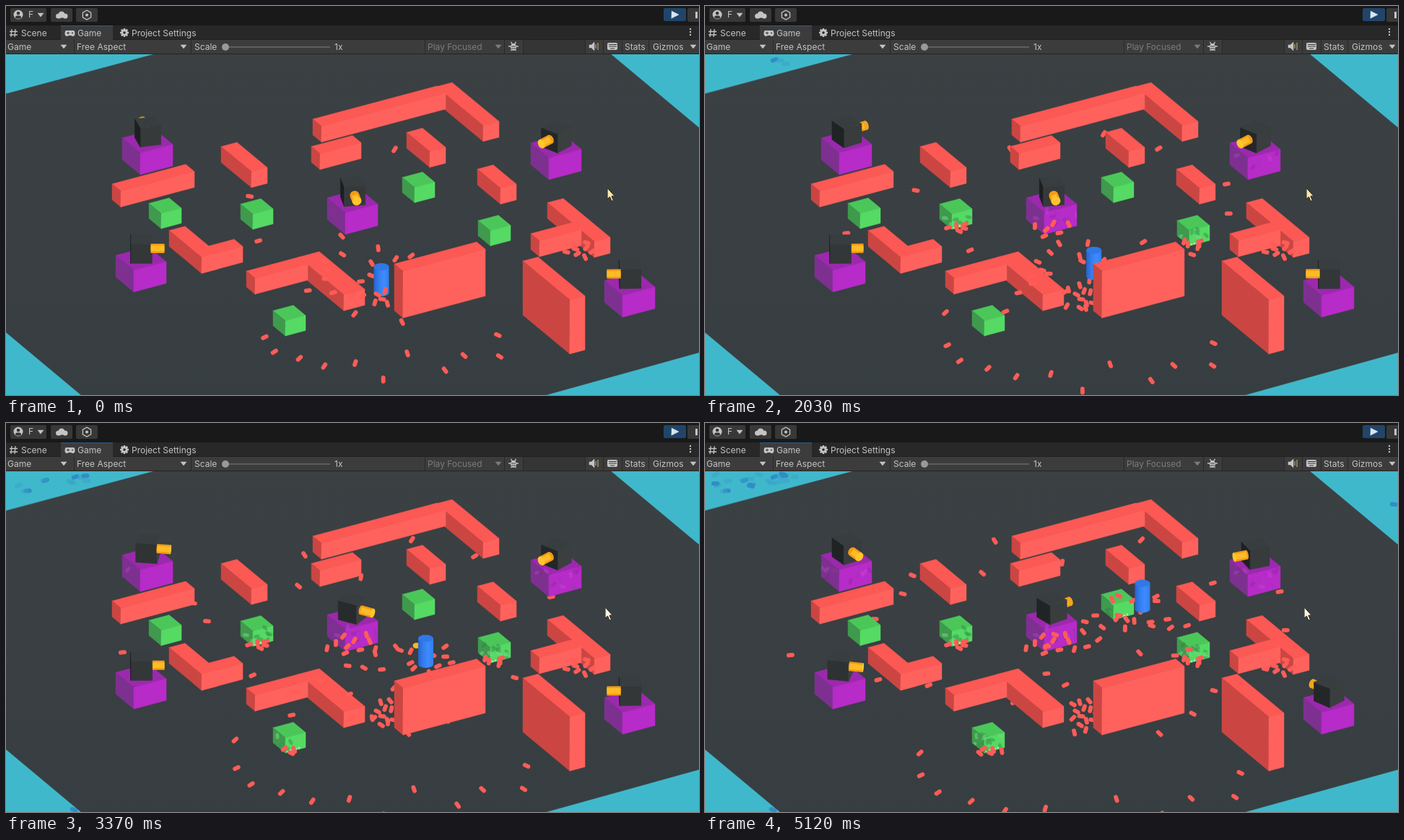
Recreate the animation shown at these times as an HTML page with a canvas. Size 960 by 540 pixels, loop 5190 ms.

```html
<!DOCTYPE html>
<html>
<head>
<meta charset="utf-8">
<style>
html, body { margin: 0; width: 100%; height: 100%; overflow: hidden; background: #191919; }
canvas { display: block; }
</style>
</head>
<body>
<canvas id="stage" width="960" height="540"></canvas>
<script>
const c = document.getElementById('stage').getContext('2d');
const LOOP = 5190, STEP = LOOP / 74;
const RISE = 0.267, FALL = 0.83, SQUASH = 0.46;
const RED = ['#fc5854', '#ff625c', '#cb4642'];
const GREEN = ['#4bc75a', '#55da64', '#3f9a4d'];
const PURPLE = ['#9c29ad', '#b72bc8', '#7e3091'];
const BULLET = '#ff5c57', MARK = '#318dc7', INK = '#c4c4c4';
const TURN = Math.PI * 2, GOLDEN = 2.39996;

// Near top corner and length: walls running back, then walls running right.
const backWalls = [
  [661, 166, 65], [340, 230, 42], [587, 202, 32], [685, 253, 32],
  [271, 349, 45], [468, 401, 63], [815, 327, 65]
];
const sideWalls = [
  [437, 167, 172], [435, 205, 57], [159, 257, 102],
  [271, 349, 57], [345, 378, 73], [739, 326, 58]
];
const crates = [
  { x: 215, y: 288, hit: 9 }, { x: 342, y: 289, hit: 0.7 }, { x: 566, y: 252, hit: 4.5 },
  { x: 671, y: 312, hit: 0.6 }, { x: 387, y: 437, hit: 2.7 }
];
const bump = (t, at, width) => Math.exp(-(((t - at) / width) ** 2));
const after = (t, start) => Math.max(0, t - start);
// Each aim is an angle on the floor in degrees.
const turrets = [
  { x: 186, y: 204, hit: 3, aim: t => -105 + 162 * (t / 5.12) ** 0.85 },
  { x: 752, y: 211, hit: 1, aim: t => 131 + 38 * bump(t, 1.15, 0.4) + 15 * after(t, 3.4) },
  { x: 470, y: 287, hit: 0.3, aim: t => 80 - 39 * after(t, 2.1) },
  { x: 177, y: 367, hit: 9, aim: t => 2.4 * t * Math.cos(4.49 * (t - 3.75)) },
  { x: 854, y: 402, hit: 9, aim: t => 178 + 55 * bump(t, 1.19, 0.4) + 17 * after(t, 3.5) ** 2 }
];
// Time and place of each turn the player takes.
const path = [
  [0, 520, 380], [1.19, 524, 382], [2.03, 540, 355], [2.94, 582, 330],
  [3.79, 581, 304], [4.35, 573, 279], [5.19, 609, 237]
];

function random(seed) {
  const v = Math.sin(seed * 127.1 + 31.7) * 43758.5453;
  return v - Math.floor(v);
}

function playerAt(t) {
  if (t <= 0) return path[0].slice(1);
  const i = path.findIndex(p => p[0] >= t);
  const [t0, x0, y0] = path[i - 1], [t1, x1, y1] = path[i];
  const p = (t - t0) / (t1 - t0);
  return [x0 + (x1 - x0) * p, y0 + (y1 - y0) * p];
}

function poly(points, color) {
  c.beginPath();
  points.forEach(p => c.lineTo(p[0], p[1]));
  c.closePath();
  if (!color) return;
  c.fillStyle = c.strokeStyle = color;
  c.lineWidth = 0.5;
  c.fill();
  c.stroke();
}

function rect(x, y, w, h, color) {
  c.fillStyle = color;
  c.fillRect(x, y, w, h);
}

function disc(x, y, rx, ry, color, turn = 0) {
  c.beginPath();
  c.ellipse(x, y, rx, ry, turn, 0, TURN);
  c.fillStyle = color;
  c.fill();
}

function box(x, y, a, b, h, [top, front, side]) {
  const near = [x, y], right = [x + a, y - a * RISE], left = [x - b, y - b * FALL];
  const back = [right[0] - b, right[1] - b * FALL];
  const low = p => [p[0], p[1] + h];
  poly([near, right, back, left], top);
  poly([near, left, low(left), low(near)], side);
  poly([near, right, low(right), low(near)], front);
  return [left, back, right, low(right), low(near), low(left)];
}

// Paint marks that gather on a box and stay inside its outline.
function hits(outline, start, t, colors) {
  const count = Math.min(12, after(t, start) * 5);
  const [x, y] = outline[0], width = outline[2][0] - x;
  c.save();
  poly(outline);
  c.clip();
  for (let i = 0; i < count; i++) {
    const s = x + i * 3.7;
    disc(x + random(s) * width, y + 8 + random(s + 1) * 30,
      4.5, 2.5, colors[i % colors.length], random(s + 2) * 3);
  }
  c.restore();
}

function crate({ x, y, hit }, t) {
  const outline = box(x, y, 28, 17, 21, GREEN);
  hits(outline, hit, t, ['#2f7d4466', '#3a955088', '#72d88488']);
  for (let i = 0; i < 5 && t > hit + 0.4; i++) {
    disc(x + 3 + i * 4, y + 19 - i * 1.3, 1.6, 1, i % 2 ? '#a5eee0' : '#d9ec8b', i);
  }
}

function barrel(x, y, angle) {
  const dx = Math.cos(angle), dy = Math.sin(angle) * SQUASH;
  const turn = Math.atan2(dy, dx), flat = 6.5 * Math.sqrt(1 - dx * dx - dy * dy);
  const root = [x + dx * 13, y + dy * 13], tip = [x + dx * 32, y + dy * 32];
  disc(...root, flat, 6.5, '#f19c16', turn);
  lines([[...root, ...tip]], 13, '#f19c16');
  lines([[...root, ...tip]], 8, '#ffbb25');
  disc(...tip, flat, 6.5, dy > 0 ? '#ffc62d' : '#f3a51c', turn);
}

function turret({ x, y, hit, aim }, t) {
  hits(box(x, y, 45, 25, 30, PURPLE), hit, t, ['#d46be033', '#63207a33', '#8a3f9c44']);
  const angle = aim(t) * Math.PI / 180, quarter = TURN / 4;
  const cx = x + 10.5, cy = y - 16.5, height = 26;
  const away = Math.sin(angle) < 0;
  const corner = (i, z) => {
    const a = angle + (i + 0.5) * quarter;
    return [cx + Math.cos(a) * 21, cy + Math.sin(a) * 21 * SQUASH - z];
  };
  if (away) barrel(cx, cy - 14, angle);
  poly([0, 1, 2, 3].map(i => corner(i, height)), '#383e40');
  for (let i = 0; i < 4; i++) {
    const normal = angle + (i + 1) * quarter, lit = Math.cos(normal);
    if (Math.sin(normal) <= 0) continue;
    const g = Math.round(51 + lit * (lit < 0 ? 24 : 10));
    poly([corner(i, height), corner(i + 1, height), corner(i + 1, 0), corner(i, 0)],
      `rgb(${g},${g + 4},${g + 5})`);
  }
  if (!away) barrel(cx, cy - 14, angle);
}

function player(t) {
  const [x, y] = playerAt(t);
  if (t > 2.7 && t < 4.8) disc(x + 13 * Math.sign(Math.cos((t - 2.9) * 4)), y - 8, 5, 4, '#ffb61f');
  const body = c.createLinearGradient(x - 10, 0, x + 10, 0);
  ['#2866cd', '#347df0', '#3d8cff', '#347eed'].forEach((s, i) => body.addColorStop(i / 3, s));
  disc(x, y + 18, 10.5, 5, body);
  rect(x - 10.5, y - 18, 21, 36, body);
  disc(x, y - 18, 10.5, 5, '#3178e6');
}

function bullet(x, y, angle, color = BULLET) {
  const dx = Math.cos(angle) * 2.6, dy = Math.sin(angle) * 2.6;
  c.lineCap = 'round';
  c.lineWidth = 5.8;
  c.strokeStyle = color;
  c.beginPath();
  c.moveTo(x - dx, y - dy);
  c.lineTo(x + dx, y + dy);
  c.stroke();
}

// A bullet at a distance from a point, measured along the floor.
function shot([x, y], angle, distance) {
  const dx = Math.cos(angle), dy = Math.sin(angle) * SQUASH;
  bullet(x + dx * distance, y + dy * distance, Math.atan2(dy, dx));
}

// The player fires in all directions; the shots slow down and fade out of play.
function spray(t) {
  const rate = 11, life = 2.6;
  for (let i = Math.ceil((t - life) * rate); i < t * rate; i++) {
    const age = t - i / rate;
    shot(playerAt(i / rate), i * GOLDEN, 14 + 110 * (1 - Math.exp(-age * 0.7)) * (0.6 + random(i)));
  }
}

// Old shots still rolling outwards at an even speed.
function rolling(t) {
  for (let i = 0; i < 11; i++) {
    shot(path[0].slice(1), (46 + i * 8.7) * Math.PI / 180, 215 + random(i + 4) * 115 + 17 * t);
  }
  for (let i = 0; i < 26; i++) {
    const age = t - i * 0.2 + 0.8;
    if (age > 0) shot([480, 290], i * GOLDEN + 2.6, 130 + random(i + 70) * 170 + 25 * age);
  }
}

// Spent bullets lying around a spot, more of them as time goes on.
function pile(x, y, rx, ry, count) {
  for (let i = 0; i < count; i++) {
    const r = Math.sqrt((i + 0.5) / 12), a = i * GOLDEN + x;
    bullet(x + Math.cos(a) * rx * r, y + Math.sin(a) * ry * r, random(x + i) * 3);
  }
}

function piles(t) {
  pile(795, 338, 30, 14, 8);
  pile(524, 404, 18, 24, 4 + t * 1.6);
  pile(480, 308, 44, 18, Math.min(10, after(t, 0.5) * 4));
  for (const { x, y, hit } of crates) pile(x + 8, y + 18, 30, 9, Math.min(5, after(t, hit) * 4));
}

function marks(t) {
  for (let i = 0; i < after(t, 1.6) * 6; i++) {
    const x = i < 3 ? 96 + i * 8 : 5 + random(i) * 140;
    bullet(x, 71 + random(i + 50) * (40 - x * RISE), 0.4 - random(i + 9), i % 3 ? '#3a9fc988' : MARK);
  }
  if (t > 2.5) bullet(94, 537, 0.4, MARK);
  if (t > 3.7) bullet(954, 113, 0.1, t < 4 ? BULLET : MARK);
}

function game(t) {
  rect(0, 67, 960, 473, '#40b8cb');
  marks(t);
  const floor = c.createLinearGradient(0, 67, 0, 540);
  floor.addColorStop(0, '#3b4043');
  floor.addColorStop(1, '#373e41');
  poly([[205, 67], [838, 67], [960, 169], [960, 481], [748, 540], [104, 540], [0, 453], [0, 122]], floor);
  rolling(t);
  backWalls.forEach(([x, y, length]) => box(x, y, x === 468 ? 29 : 22, length, 22, RED));
  sideWalls.forEach(([x, y, length]) => box(x, y, length, 12, 22, RED));
  box(781, 408, 21, 65, 75, RED);
  crates.forEach(k => crate(k, t));
  turrets.forEach(g => turret(g, t));
  spray(t);
  player(t);
  piles(t);
  box(550, 368, 114, 12, 65, RED);
  pointer(...(t < 2.8 ? [833, 253, '#ffe6ae'] : [830, 256, '#fff4df']));
}

function pointer(x, y, color) {
  poly([[0, 0], [0, 15], [3.5, 12], [6, 18], [8.5, 17], [6, 11], [10, 11]]
    .map(p => [x + p[0], y + p[1]]), color);
  c.lineWidth = 1;
  c.strokeStyle = '#111';
  c.stroke();
}

function text(s, x, y, color = INK) {
  c.fillStyle = color;
  c.font = '12px Inter, sans-serif';
  c.fillText(s, x, y);
}

function arrow(x, y, color = INK) {
  poly([[x - 4, y - 2], [x + 4, y - 2], [x, y + 3]], color);
}

function lines(segments, width = 1.3, color = INK) {
  c.beginPath();
  for (const [x0, y0, x1, y1] of segments) { c.moveTo(x0, y0); c.lineTo(x1, y1); }
  c.lineWidth = width;
  c.strokeStyle = color;
  c.lineCap = 'butt';
  c.stroke();
}

function button(x, y, w, h, color) {
  c.beginPath();
  c.roundRect(x, y, w, h, 2);
  c.fillStyle = color;
  c.fill();
}

function ring(x, y, count, radius, start = 0) {
  return Array.from({ length: count }, (_, i) => {
    const a = start + i * TURN / count;
    return [x + Math.cos(a) * radius, y + Math.sin(a) * radius];
  });
}

function spokes(x, y, count, radius, width) {
  lines(ring(x, y, count, radius).map(p => [x, y, ...p]), width);
}

function topBar() {
  rect(0, 0, 960, 27, '#191919');
  [[6, 50], [62, 30], [97, 30], [944, 30]].forEach(([x, w]) => button(x, 3, w, 19, '#383838'));
  button(911, 3, 31, 18, '#21456a');
  disc(17, 12, 6.5, 6.5, INK);
  disc(17, 10, 2.3, 2.3, '#383838');
  disc(17, 15.5, 4, 2.2, '#383838');
  text('F', 31, 16);
  arrow(48, 12);
  disc(73, 14, 4, 3.5, INK);
  disc(77, 12, 4.5, 4.5, INK);
  disc(82, 14, 3.5, 3.5, INK);
  poly(ring(112, 12.5, 6, 6.5, TURN / 12));
  c.strokeStyle = INK;
  c.lineWidth = 1.3;
  c.stroke();
  disc(112, 12.5, 2, 2, INK);
  poly([[922, 7], [932, 12], [922, 17]], '#d8e6f2');
  rect(955, 8, 3, 9, INK);
}

function tabs() {
  rect(0, 27, 960, 20, '#282828');
  rect(76, 27, 72, 20, '#3c3c3c');
  rect(76, 27, 72, 1, '#2c5d87');
  lines([[8, 32, 7, 43], [13, 32, 12, 43], [5, 35.5, 16, 35.5], [5, 40, 16, 40]]);
  text('Scene', 21, 42);
  button(82, 34, 13, 7, INK);
  [84.5, 92.5].forEach(x => disc(x, 38, 3, 4, INK));
  lines([[84, 37.5, 88, 37.5], [86, 35.5, 86, 39.5]], 1, '#3c3c3c');
  disc(92, 37.5, 1, 1, '#3c3c3c');
  text('Game', 99, 42);
  spokes(164, 37, 8, 6, 2.5);
  disc(164, 37, 4.5, 4.5, INK);
  disc(164, 37, 1.8, 1.8, '#282828');
  text('Project Settings', 174, 42);
  [32, 36, 40].forEach(y => disc(948, y, 1.2, 1.2, INK));
}

function viewBar() {
  rect(0, 47, 960, 20, '#3c3c3c');
  rect(0, 46, 76, 1, '#202020');
  rect(148, 46, 812, 1, '#202020');
  rect(0, 66, 960, 1, '#232323');
  [94, 256, 580, 690, 716, 802, 827, 853, 890].forEach(x => rect(x, 47, 1, 19, '#292929'));
  rect(717, 47, 85, 19, '#353535');
  text('Game', 2, 61);
  text('Free Aspect', 98, 61);
  text('Scale', 261, 61);
  text('1x', 455, 61);
  text('Play Focused', 584, 61, '#7c7c7c');
  text('Stats', 857, 61);
  text('Gizmos', 896, 61);
  [80, 246, 952].forEach(x => arrow(x, 56));
  arrow(682, 56, '#7c7c7c');
  rect(304, 56, 145, 2, '#5e5e5e');
  disc(304, 57, 5, 5, '#999');
  spokes(703, 56, 6, 7, 1.3);
  disc(703, 57, 4, 5, INK);
  lines([[700, 56, 706, 56], [700, 59, 706, 59]], 1, '#3c3c3c');
  poly([[808, 54], [811, 54], [815, 50], [815, 62], [811, 58], [808, 58]], INK);
  lines([[817, 53, 817, 59], [820, 51, 820, 61]], 1, '#d9b678');
  button(833, 51, 14, 10, INK);
  lines([[835, 53.5, 846, 53.5], [835, 56, 846, 56], [837, 59, 843, 59]], 1, '#3c3c3c');
}

function draw(now) {
  game(Math.floor((now % LOOP) / STEP) * STEP / 1000);
  topBar();
  tabs();
  viewBar();
  requestAnimationFrame(draw);
}

draw(0);
</script>
</body>
</html>
```
